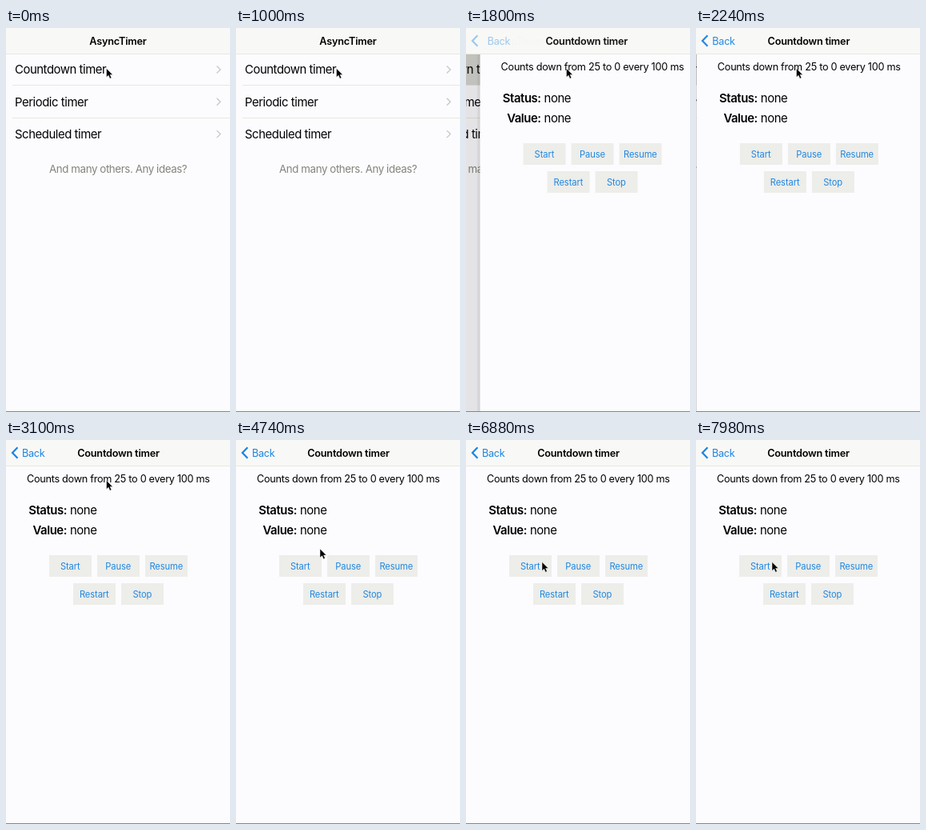
Recreate the animation shown at these times as an HTML page. Size 280x480 px, loop 8 s.

```html
<!DOCTYPE html>
<html lang="en">
<head>
<meta charset="utf-8">
<title>AsyncTimer</title>
<style>
  html, body { margin: 0; width: 100%; height: 100%; overflow: hidden; background: #fcfcff; }
  svg { display: block; width: 280px; height: 480px; }
  text { font: 400 14.9px Inter, Roboto, sans-serif; letter-spacing: -.03em; fill: #000; white-space: pre; }
  .bold { font-weight: 600; }
  .bar { font-size: 12.7px; letter-spacing: -.023em; }
  .bar.bold { letter-spacing: -.016em; }
  .hint { font-size: 13.3px; fill: #84847a; }
  .button text { font-size: 11.2px; letter-spacing: -.01em; fill: #1f87e0; text-anchor: middle; }
  .button rect { fill: #ededea; }
  .line { stroke: #e8e8dc; }
  .chevron { fill: none; stroke: #c7c7be; stroke-width: 1.3; }
  #back text { fill: #1a84e4; }
  #back path { fill: none; stroke: #1a84e4; stroke-width: 2.2; }
</style>
</head>
<body>
<svg viewBox="0 0 280 480">
  <defs>
    <linearGradient id="edge">
      <stop offset="0" stop-color="#000" stop-opacity="0"/>
      <stop offset="1" stop-color="#000" stop-opacity=".1"/>
    </linearGradient>
  </defs>

  <g id="list">
    <rect width="280" height="480" fill="#fcfcff"/>
    <rect id="highlight" y="32" width="280" height="40" fill="#d5d5d0"/>
    <g id="rows"></g>
    <text class="hint" x="54" y="180.5">And many others. Any ideas?</text>
  </g>
  <rect id="dim" width="280" height="480" fill="#000"/>

  <g id="detail">
    <rect x="-5" width="5" height="480" fill="url(#edge)"/>
    <rect width="280" height="480" fill="#fcfcff"/>
    <text class="bar" x="26" y="53">Counts down from 25 to 0 every 100 ms</text>
    <text class="bold" x="76" y="93" text-anchor="end">Status:</text>
    <text x="80" y="93">none</text>
    <text class="bold" x="76" y="118.3" text-anchor="end">Value:</text>
    <text x="80" y="118.3">none</text>
    <g id="buttons"></g>
  </g>

  <rect width="280" height="32" fill="#f8f8f6"/>
  <path class="line" d="M0 32.5H280"/>
  <text id="listTitle" class="bar bold" x="140" y="20.5" text-anchor="middle">AsyncTimer</text>
  <text id="detailTitle" class="bar bold" x="140.5" y="20.5" text-anchor="middle">Countdown timer</text>
  <g id="back">
    <path d="M14.5 9.2 8 16l6.5 6.8"/>
    <text id="backLabel" class="bar" x="20" y="20.5">Back</text>
  </g>
  <path d="M0 479.5H280" stroke="#858585"/>
  <path id="cursor" d="M0 0V11L2.6 8.7 4.4 12.7 6.4 11.8 4.6 8H8Z" fill="#000" stroke="#fff" stroke-width=".5"/>
</svg>
<script>
  const $ = id => document.getElementById(id);
  const LOOP = 8000, PRESS = 1150, PUSH = 1243, SPRING = 0.008;

  // time, x, y of the pointer tip
  const pointer = [[0, 125.5, 50.5], [4200, 125.5, 50.5], [4740, 105, 136], [5100, 95, 152.5], [LOOP, 95, 152.5]];

  $('rows').innerHTML = ['Countdown timer', 'Periodic timer', 'Scheduled timer'].map((name, i) => {
    const y = 52 + i * 40.3;
    const line = i < 2 ? `<path class="line" d="M8 ${71.5 + i * 41}H280"/>` : '';
    return `<text x="11" y="${y + 5.4}">${name}</text>
      <path class="chevron" d="M263.5 ${y - 4.5}l4.5 4.5-4.5 4.5"/>${line}`;
  }).join('');

  $('buttons').innerHTML = [
    ['Start', 54, 144], ['Pause', 114, 144], ['Resume', 174, 144],
    ['Restart', 84, 179], ['Stop', 144, 179]
  ].map(([name, x, y]) => `<g class="button" transform="translate(${x} ${y})">
    <rect width="53" height="27"/><text x="26.3" y="17.6">${name}</text></g>`).join('');

  const move = (id, x, y = 0) => $(id).setAttribute('transform', `translate(${x} ${y})`);
  const fade = (id, value) => $(id).setAttribute('opacity', value);

  function pointerAt(t) {
    const i = pointer.findIndex(step => step[0] > t);
    const [t0, x0, y0] = pointer[i - 1], [t1, x1, y1] = pointer[i];
    const k = (t - t0) / (t1 - t0);
    return [x0 + (x1 - x0) * k, y0 + (y1 - y0) * k];
  }

  function draw(t) {
    // critically damped spring: rest runs from 1 to 0
    const s = Math.max(0, t - PUSH) * SPRING;
    const rest = (1 + s) * Math.exp(-s), done = 1 - rest;
    const titleShift = 85 * done ** 1.25;

    fade('highlight', t >= PRESS ? 1 : 0);
    move('list', -84 * done);
    fade('dim', 0.1 * done);
    move('detail', 280 * rest);
    fade('detail', s > 0 ? 1 : 0);

    move('listTitle', -titleShift);
    fade('listTitle', rest ** 1.8);
    move('detailTitle', 222 * rest ** 1.11);
    fade('detailTitle', done);
    move('backLabel', 85 - titleShift);
    fade('back', done ** 14);
    move('cursor', ...pointerAt(t));
  }

  const start = performance.now();
  function tick() {
    draw((performance.now() - start) % LOOP);
    requestAnimationFrame(tick);
  }
  tick();
</script>
</body>
</html>
```
